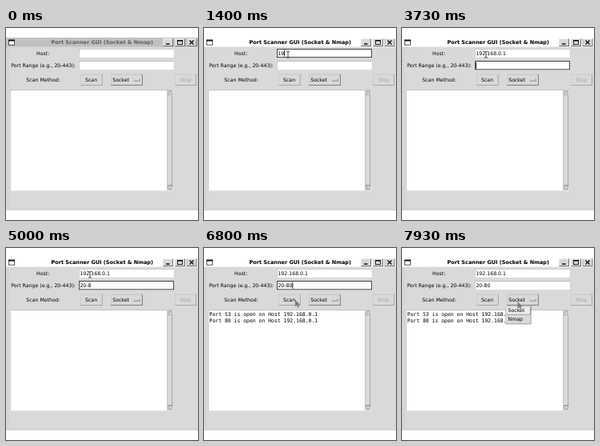
Recreate the animation shown at these times as an HTML page. Size 240 by 240 pixels, loop 8 s.

```html
<!DOCTYPE html>
<html lang="en">
<head>
<meta charset="utf-8">
<title>Port Scanner</title>
<style>
html, body { margin: 0; width: 100%; height: 100%; overflow: hidden; background: #fff; }
svg { display: block; width: 100vw; height: 100vh; }
text { font-family: "DejaVu Sans", sans-serif; font-size: 6.22px; white-space: pre; text-rendering: geometricPrecision; }
.title { font-weight: bold; font-size: 6.52px; }
.mono { font-family: "DejaVu Sans Mono", monospace; font-size: 6.45px; }
</style>
</head>
<body>
<svg id="stage" viewBox="0 0 240 240"></svg>
<script>
const LOOP = 8000;
const GREY = '#d9d9d9', LIGHT = '#f6f6f6', DARK = '#858585', SOFT = '#a4a4a4', HOVER = '#ececec';
const stage = document.getElementById('stage');

function add(tag, attrs, parent = stage) {
  const el = document.createElementNS('http://www.w3.org/2000/svg', tag);
  for (const key in attrs) el.setAttribute(key, attrs[key]);
  return parent.appendChild(el);
}
const group = () => add('g', {});
const rect = (x, y, width, height, fill, parent) => add('rect', { x, y, width, height, fill }, parent);
const path = (d, fill, parent, extra = {}) => add('path', { d, fill, ...extra }, parent);
function label(x, y, content, parent, attrs = {}) {
  const el = add('text', { x, y, ...attrs }, parent);
  el.textContent = content;
  return el;
}
function bevel(x, y, w, h, fill, parent, { top = LIGHT, bottom = DARK, edge = 0.7 } = {}) {
  rect(x, y, w, h, bottom, parent);
  path(`M${x} ${y}h${w}l${-edge} ${edge}H${x + edge}V${y + h - edge}L${x} ${y + h}z`, top, parent);
  rect(x + edge, y + edge, w - 2 * edge, h - 2 * edge, fill, parent);
}
const SUNKEN = { top: SOFT, bottom: LIGHT };
const show = (el, on) => el.setAttribute('display', on ? 'inline' : 'none');
const paint = (el, color) => el.setAttribute('fill', color);

// Window frame
rect(0, 12, 240, 216, GREY);
const titleBar = rect(0, 12, 240, 11.5, '#fff');
rect(2, 23.5, 0.6, 203.5, '#c9c9c9');
rect(2, 226.6, 238, 0.7, '#c9c9c9');
const title = label(56.5, 19.8, 'Port Scanner GUI (Socket & Nmap)', stage, { class: 'title' });
rect(3, 14.5, 8, 7, '#111');
rect(3.7, 16.5, 6.6, 4.3, '#fff');
[196, 211, 225.5].forEach((x, i) => {
  bevel(x, 13, 13, 10, GREY, stage, { bottom: '#666', edge: 0.9 });
  if (i === 0) rect(x + 4, 19.3, 4.5, 1.4, '#000');
  if (i === 1) {
    add('rect', { x: x + 3.5, y: 15.5, width: 6, height: 5, fill: 'none', stroke: '#000', 'stroke-width': 0.8 });
    rect(x + 3.1, 15.1, 6.8, 1.4, '#000');
  }
  if (i === 2) path(`M${x + 4} 15.5l5 5m0-5l-5 5`, 'none', stage, { stroke: '#000', 'stroke-width': 1.2 });
});

// Form
label(38, 33.6, 'Host:');
label(6.3, 48.8, 'Port Range (e.g., 20-443):');
label(25.3, 66.6, 'Scan Method:');

function entry(y) {
  bevel(91, y, 118.8, 11, '#fff', stage, SUNKEN);
  const ring = add('rect', {
    x: 91.4, y: y + 0.4, width: 118.2, height: 10.2, fill: 'none', stroke: '#222', 'stroke-width': 0.8
  });
  const text = label(92.4, y + 7.7, '');
  const caret = rect(92.4, y + 1.5, 0.9, 8, '#000');
  return (value, focused, blinkOn) => {
    text.textContent = value;
    show(ring, focused);
    show(caret, focused && blinkOn);
    caret.setAttribute('x', 92.3 + (value ? text.getComputedTextLength() : 0));
  };
}
const drawHost = entry(26);
const drawRange = entry(41.2);

function button(x, w, name, textX, edge) {
  bevel(x, 57.5, w, 14.5, GREY, stage, { edge });
  return label(textX, 66.8, name);
}
const scan = button(93, 27.5, 'Scan', 99, 0.6);
button(130.3, 40.7, 'Socket', 133.2, 1.1);
const stop = button(211, 27, 'Stop', 217.3, 0.6);
bevel(159.5, 63.2, 8, 3.4, GREY, stage, { edge: 0.9 });

// Output area and scrollbar
bevel(5, 77.5, 196.5, 126, '#fff', stage, SUNKEN);
bevel(201.5, 77.5, 7.5, 126, '#c3c3c3', stage, SUNKEN);
bevel(202.2, 84, 6, 113, GREY);
path('M205.2 78.5l3 5h-6z', GREY, stage, { stroke: DARK, 'stroke-width': 0.5 });
path('M205.2 202.5l3-5h-6z', GREY, stage, { stroke: DARK, 'stroke-width': 0.5 });
const results = [53, 80].map((port, i) =>
  label(6.6, 85.2 + i * 8, `Port ${port} is open on Host 192.168.0.1`, stage, { class: 'mono' }));

// Drop-down
const menu = group();
bevel(129, 72, 32.5, 23.3, GREY, menu);
bevel(129.7, 72.7, 31, 10.8, HOVER, menu);
label(132.5, 80.3, 'Socket', menu);
label(132.5, 91, 'Nmap', menu);

// Pointers, both with their hot spot at 0,0
const arrow = group();
path('M0 0V8.2L2 6.4L3.4 9.4L4.8 8.8L3.5 5.9H6z', '#777', arrow, { stroke: '#999', 'stroke-width': 0.5 });
const beam = group();
path('M-2-3.7Q0-3.7 0-2.7Q0-3.7 2-3.7M0-2.7V3.2M-2 4.2Q0 4.2 0 3.2Q0 4.2 2 4.2', 'none', beam,
  { stroke: '#222', 'stroke-width': 0.8 });

// Timeline
const hostKeys = [1000, 1300, 1430, 1600, 1750, 1870, 2000, 2400, 2600, 2800, 3000];
const rangeKeys = [3930, 4130, 4400, 4700, 5470];
const track = [
  [70, -6, 45], [400, 105, 33], [5550, 105, 33], [6130, 114, 65],
  [7000, 114, 65], [7400, 147, 66], [7730, 145, 66], [7930, 144.5, 67.3]
];
const FOCUS = 400, TAB = 3470, CLICK = 6400, DONE = 6600, OPEN = 7530;

const typed = (value, keys, t) => value.slice(0, keys.filter(k => k <= t).length);

function pointerAt(t) {
  const next = track.findIndex(p => p[0] > t);
  if (next === 0) return track[0].slice(1);
  if (next < 0) return track[track.length - 1].slice(1);
  const [t0, x0, y0] = track[next - 1], [t1, x1, y1] = track[next];
  const u = (t - t0) / (t1 - t0), ease = u * u * (3 - 2 * u);
  return [x0 + (x1 - x0) * ease, y0 + (y1 - y0) * ease];
}

function draw(t) {
  const active = t >= FOCUS;
  paint(titleBar, active ? '#fff' : '#c0c0c0');
  paint(title, active ? '#000' : '#606060');

  const blinkStart = t >= CLICK ? CLICK : t >= TAB ? TAB : FOCUS;
  const blinkOn = (t - blinkStart) % 900 < 600;
  drawHost(typed('192.168.0.1', hostKeys, t), active && t < TAB, blinkOn);
  drawRange(typed('20-80', rangeKeys, t), t >= TAB && t < OPEN, blinkOn);

  const scanning = t >= CLICK && t < DONE;
  paint(scan, scanning ? '#a3a3a3' : '#000');
  paint(stop, scanning ? '#000' : '#a3a3a3');
  results.forEach(line => show(line, t >= DONE));
  show(menu, t >= OPEN);

  const [x, y] = pointerAt(t);
  const inEntry = x >= 91 && x <= 210 && ((y >= 26 && y <= 37) || (y >= 41 && y <= 52));
  show(beam, inEntry);
  show(arrow, !inEntry && t >= 70);
  for (const el of [beam, arrow]) el.setAttribute('transform', `translate(${x} ${y})`);
}

const start = performance.now();
function frame() {
  draw((performance.now() - start) % LOOP);
  requestAnimationFrame(frame);
}
frame();
</script>
</body>
</html>
```
